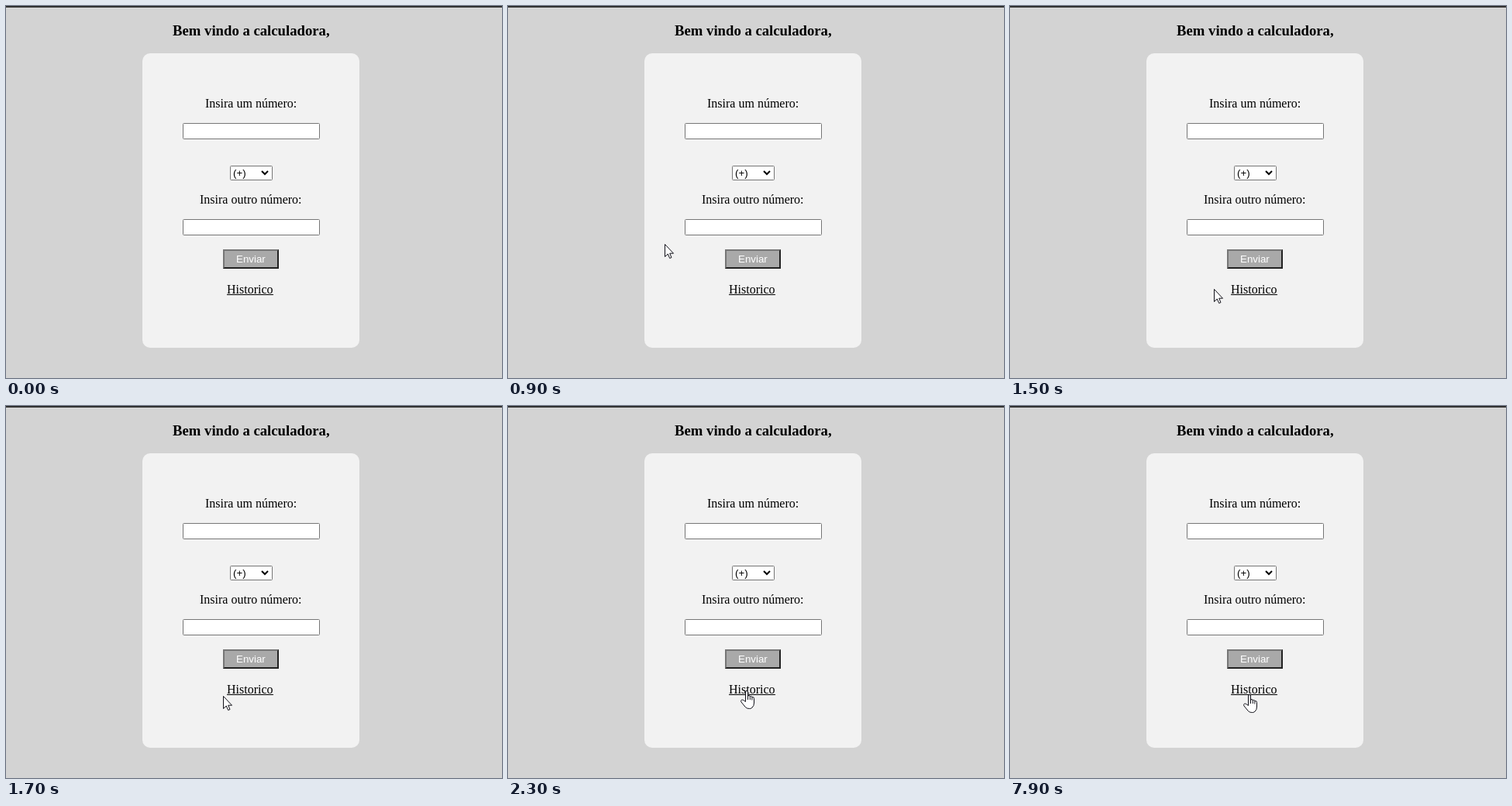
Write an HTML page with a canvas that moves like this. It is 640x480 px and loops after 8 s.

```html
<!DOCTYPE html>
<html lang="pt">
<head>
<meta charset="utf-8">
<title>Calculadora</title>
<style>
  html, body { margin: 0; width: 100%; height: 100%; overflow: hidden; background: #d3d3d3; }
  canvas { display: block; width: 640px; height: 480px; }
</style>
</head>
<body>
<canvas id="stage" width="640" height="480"></canvas>
<script>
const ctx = document.getElementById('stage').getContext('2d', { alpha: false });
const LOOP = 8000;
const TICK = 100;
const SHOW = 400;
const HOVER = 2200;
const SERIF = '"Liberation Serif", "Times New Roman", serif';
const SANS = '"Liberation Sans", Arial, sans-serif';

const arrow = new Path2D('M.5 .5V16.5L4.3 13L6.7 18.5L9 17.5L6.7 12.2H11.5Z');
const hand = new Path2D(
  'M6.5 14.5V2Q6.5 .5 8 .5T9.5 2V7.5Q9.7 6.6 11 6.6T12.3 8' +
  'Q12.6 7.4 13.6 7.4T14.9 9Q15.3 8.5 16 8.6Q17.5 8.8 17.5 10.5V16' +
  'Q17.5 20 15 22.2Q13.8 23.5 11.5 23.5Q8 23.5 6.3 21.5L1 15' +
  'Q0 13.4 1.2 12.4Q2.5 11.6 3.8 12.6Z');
const fingers = new Path2D('M9.5 7V12M12.3 8V12M14.9 9V12.5');

// Pointer strokes: quadratic curves through from, bend and to
const strokes = [
  { start: 400, end: 600, from: [35, 44], bend: [120, 185], to: [157, 252] },
  { start: 700, end: 1100, from: [157, 252], bend: [205, 313], to: [241, 348] },
  { start: 1300, end: 2200, from: [241, 348], bend: [295, 393], to: [304, 369] },
  { start: 2200, end: 2300, from: [304, 369], bend: [305, 368], to: [306, 367] },
  { start: 6900, end: 7900, from: [306, 367], bend: [306, 370], to: [307, 372] }
];

function rect(x, y, w, h, color) {
  ctx.fillStyle = color;
  ctx.fillRect(x, y, w, h);
}

function box(x, y, w, h, r, fill, stroke) {
  ctx.beginPath();
  ctx.roundRect(x, y, w, h, r);
  ctx.fillStyle = fill;
  ctx.fill();
  if (!stroke) return;
  ctx.lineWidth = 1;
  ctx.strokeStyle = stroke;
  ctx.stroke();
}

function text(str, x, y, font, color = '#000') {
  ctx.font = font;
  ctx.fillStyle = color;
  ctx.fillText(str, x, y);
}

function field(y) {
  box(228.5, y + .5, 176, 20, 1, '#fff', '#767676');
}

function select() {
  box(289.5, 206.5, 54, 18, 1, '#fff', '#767676');
  text('(+)', 293, 220, `13.333px ${SANS}`);
  ctx.beginPath();
  ctx.moveTo(330, 213);
  ctx.lineTo(334, 217);
  ctx.lineTo(338, 213);
  ctx.lineWidth = 2;
  ctx.strokeStyle = '#000';
  ctx.stroke();
}

function button() {
  rect(280, 314, 72, 25, '#767676');
  ctx.beginPath();
  ctx.moveTo(352, 314);
  ctx.lineTo(352, 339);
  ctx.lineTo(280, 339);
  ctx.lineTo(282, 337);
  ctx.lineTo(350, 337);
  ctx.lineTo(350, 316);
  ctx.fillStyle = '#212121';
  ctx.fill();
  rect(282, 316, 68, 21, '#a9a9a9');
  text('Enviar', 297, 331, `13.333px ${SANS}`, '#fff');
}

function page() {
  const body = `16px ${SERIF}`;
  rect(0, 0, 640, 480, '#d3d3d3');
  rect(0, 0, 640, 2, '#333');
  text('Bem vindo a calculadora,', 215, 38, `bold 18.72px ${SERIF}`);
  box(176, 61, 280, 380, 10, '#f2f2f2');
  text('Insira um número:', 257, 131, body);
  field(151);
  select();
  text('Insira outro número:', 250, 255, body);
  field(275);
  button();
  text('Historico', 285, 371, body);
  rect(285, 372, 60, 1, '#000');
}

function position(t) {
  const { start, end, from, bend, to } = strokes.findLast(s => s.start <= t);
  const u = Math.min(1, (t - start) / (end - start));
  const v = 1 - u;
  return from.map((p, i) => Math.round(v * v * p + 2 * u * v * bend[i] + u * u * to[i]));
}

function pointer(t) {
  if (t < SHOW) return;
  const [x, y] = position(t);
  const isHand = t >= HOVER;
  const shape = isHand ? hand : arrow;
  ctx.save();
  ctx.translate(isHand ? x - 6 : x, y);
  ctx.lineWidth = 1;
  ctx.lineJoin = 'round';
  ctx.fillStyle = '#fff';
  ctx.strokeStyle = '#101018';
  ctx.fill(shape);
  ctx.stroke(shape);
  if (isHand) ctx.stroke(fingers);
  ctx.restore();
}

const start = performance.now();

function draw() {
  const t = (performance.now() - start) % LOOP;
  page();
  pointer(Math.floor(t / TICK) * TICK);
  requestAnimationFrame(draw);
}
draw();
</script>
</body>
</html>
```
